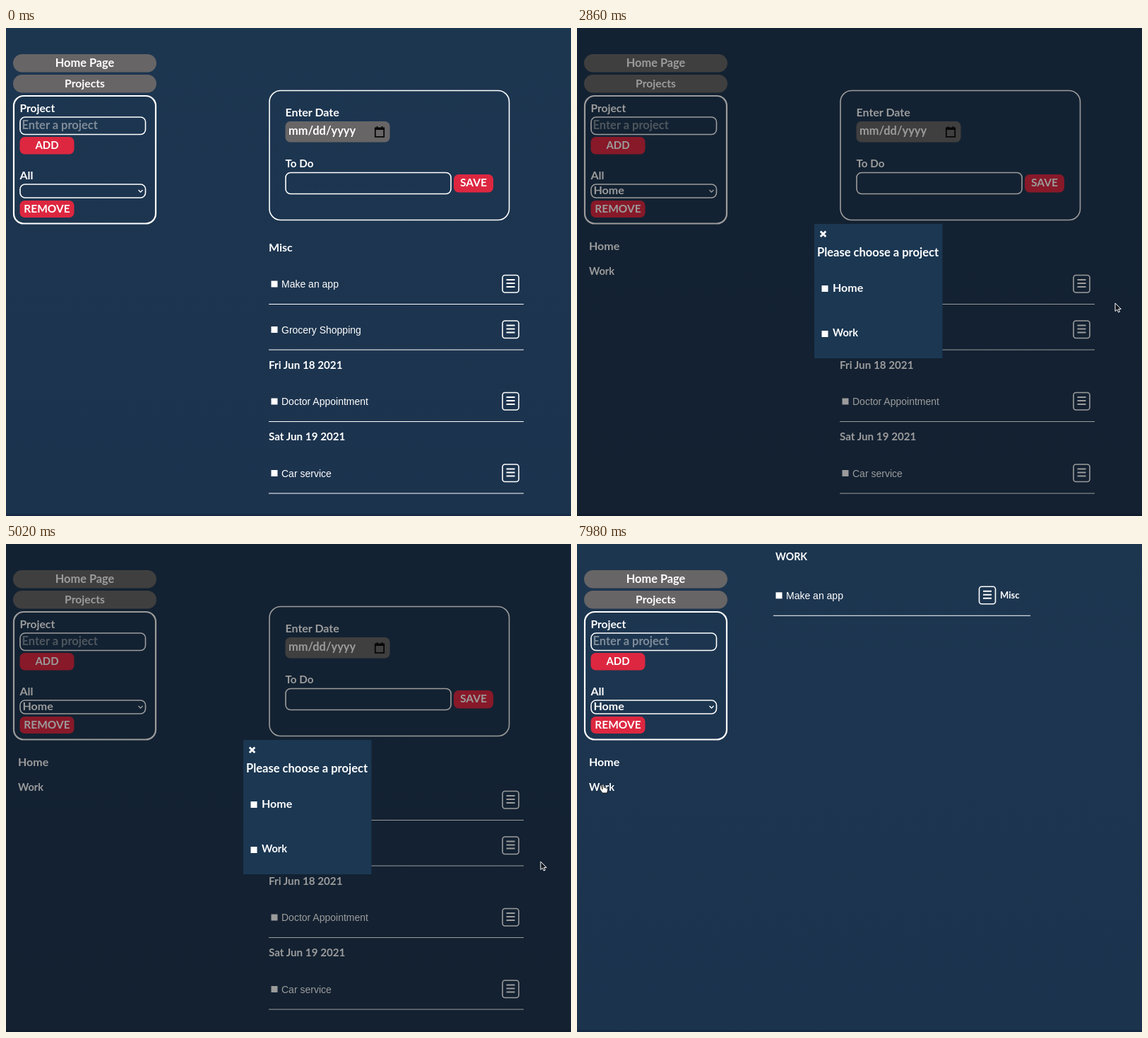
Recreate the animation shown at these times as an HTML page. Size 800 by 690 pixels, loop 8000 ms.

```html
<!DOCTYPE html>
<html lang="en">
<head>
<meta charset="utf-8">
<title>To-do list</title>
<style>
  html, body { margin: 0; width: 100%; height: 100%; overflow: hidden; background: #1c344f; }
  svg { display: block; width: 800px; height: 690px; }
  text { font: 700 16px Lato, sans-serif; fill: #fff; white-space: pre; }
  .plain { font: 400 14px "Liberation Sans", Arial, sans-serif; }
  .mid { text-anchor: middle; }
  .hint { fill: #7f8c99; font-size: 16.5px; }
  .box { fill: none; stroke: #fff; stroke-width: 1.6; }
  .grey { fill: #676566; }
  .red { fill: #dd2740; }
  .line { stroke: #fff; stroke-width: 1; }
</style>
</head>
<body>
<svg id="stage" viewBox="0 0 800 690">
  <defs>
    <linearGradient id="sky" x2="0" y2="1">
      <stop stop-color="#1d3650"/><stop offset="1" stop-color="#1c334e"/>
    </linearGradient>
  </defs>
  <rect width="800" height="690" fill="url(#sky)"/>
  <rect y="687" width="800" height="3" fill="#172a45"/>
  <g id="side"></g>
  <g id="list"></g>
  <g id="home"></g>
  <g id="work"></g>
  <g id="modal"></g>
  <g id="arrow">
    <path d="M0 0V11.5L2.7 9.1L4.6 13L6.5 12.1L4.7 8.4H8.3Z" fill="#10151c" stroke="#fff" stroke-width="1"/>
  </g>
  <g id="hand">
    <path d="M-1 0Q0-1 1 0V4L6 5.5Q7 6 6.5 8L5.5 12H-1L-4.5 7Q-4-6 -1 7Z" transform="translate(0 1)"
      fill="#fff" stroke="#111" stroke-width=".8" stroke-linejoin="round"/>
  </g>
</svg>
<script>
const $ = id => document.getElementById(id);
const add = (group, markup) => $(group).insertAdjacentHTML('beforeend', markup);
const show = (id, on) => $(id).setAttribute('display', on ? 'inline' : 'none');

const rect = (cls, x, y, w, h, r = 0, extra = '') =>
  `<rect class="${cls}" x="${x}" y="${y}" width="${w}" height="${h}" rx="${r}" ${extra}/>`;
const text = (x, y, str, cls = '', size = '', id = '') =>
  `<text x="${x}" y="${y}" class="${cls}" ${size && `style="font-size:${size}px"`} ${id && `id="${id}"`}>${str}</text>`;
const button = (x, y, w, h, label, size) =>
  rect('red', x, y, w, h, 7) + text(x + w / 2, y + 17, label, 'mid', size);
const checkbox = (x, cy) => rect('', x, cy - 4.5, 9, 9, 0, 'fill="#fff"');
const menuIcon = (x, cy) => rect('box', x, cy - 12.5, 23, 24.5, 3.5) +
  `<path d="M${x + 5.5} ${cy - 6}h12m-12 5h12m-12 5h12" stroke="#fff" stroke-width="2"/>`;
const task = (x, cy, name, iconX, lineX, lineEnd) =>
  checkbox(x, cy) + text(x + 14.5, cy + 5, name, 'plain') + menuIcon(iconX, cy) +
  `<path class="line" d="M${lineX} ${cy + 28.5}H${lineEnd}"/>`;

add('side',
  rect('grey', 10, 37, 203, 25.5, 12.7) + text(111.5, 55, 'Home Page', 'mid', 16.4) +
  rect('grey', 10, 66, 203, 25.5, 12.7) + text(111.5, 84, 'Projects', 'mid', 15.7) +
  rect('box', 11, 96, 201, 180.5, 14, 'style="stroke-width:2.2"') +
  text(19.5, 119, 'Project', '', 15.6) + rect('box', 20, 126, 177.5, 24.5, 7) +
  text(22.5, 142.5, 'Enter a project', 'hint', '', 'hint') + text(22.5, 142.5, '', '', '', 'typed') +
  button(19.5, 154, 77, 24.5, 'ADD', 15) +
  text(19.5, 214, 'All') + rect('box', 20, 221, 177.5, 19, 7) +
  '<path d="M187.5 229l3 3 3-3" fill="none" stroke="#fff" stroke-width="1.4"/>' +
  text(23.5, 235, 'Home', '', '', 'selected') +
  button(19.5, 244, 77, 24, 'REMOVE', 15.5) +
  text(17, 314, 'Home', '', '', 'homeLink') + text(17, 349, 'Work', '', 14.6, 'workLink'));

add('list',
  rect('box', 373, 88.5, 339.5, 183, 16) +
  text(395.5, 125, 'Enter Date') + rect('grey', 395.5, 132, 148, 29.5, 7) + text(400, 151, 'mm/dd/yyyy', '', 16.4) +
  '<path d="M522.8 141.5h12.4v12.4h-12.4zM522 143h14M525.5 139v3M532.5 139v3" fill="none" stroke="#080808" stroke-width="1.8"/>' +
  text(395.5, 197, 'To Do', '', 15.2) + rect('box', 396, 204.5, 234, 30, 7) +
  button(634, 207, 56, 25.5, 'SAVE', 15.5) +
  text(372, 316, 'Misc') +
  text(372, 482, 'Fri Jun 18 2021', '', 15.2) + text(372, 583, 'Sat Jun 19 2021', '', 15.2) +
  [[362, 'Make an app'], [426.5, 'Grocery Shopping'], [528, 'Doctor Appointment'], [629.5, 'Car service']]
    .map(([cy, name]) => task(375.5, cy, name, 703, 372, 733)).join(''));

const projectPage = (title, name) => text(281, 23, title, '', 14.2) +
  task(281.5, 72.8, name, 569.5, 278, 642) + text(599, 76.5, 'Misc', '', 13);
add('home', projectPage('HOME', 'Grocery Shopping'));
add('work', projectPage('WORK', 'Make an app'));

const tick = (id, cy) => `<g id="${id}">${rect('', 346.5, cy - 4.5, 9, 9, 1, 'fill="#0b75f5"')}
  <path d="M348.5 ${cy}l2 2.2 3.5-4.6" fill="none" stroke="#fff" stroke-width="1.5"/></g>`;
add('modal',
  rect('', 0, 0, 800, 690, 0, 'fill="#060606" fill-opacity=".4"') +
  rect('', 336, 277, 181.5, 190, 0, 'fill="#1b3752"') +
  '<path d="M344.8 287.5l7.5 7.5m0-7.5l-7.5 7.5" stroke="#fff" stroke-width="2.8"/>' +
  text(340, 323, 'Please choose a project', '', 16.5) +
  checkbox(346.5, 368.5) + text(362, 373, 'Home') + checkbox(346.5, 432.5) + text(362, 436, 'Work', '', 14.6) +
  tick('homeTick', 368.5) + tick('workTick', 432.5));

// Pointer stops: time, x, y
const stops = [
  [1760, 110, 140], [2200, 712, 360], [2350, 712, 360], [2530, 762, 389], [2900, 762, 389],
  [3250, 350, 430], [3600, 350, 430], [3900, 348, 289], [4050, 348, 289], [4170, 352, 294],
  [4270, 352, 294], [4560, 712, 424], [4670, 712, 424], [4800, 757, 449], [5020, 757, 449],
  [5310, 350, 367], [5620, 350, 367], [5900, 348.5, 290], [6610, 348.5, 290],
  [6950, 36, 306], [7350, 36, 306], [7620, 37, 339], [8000, 37, 339]
];
function pointerAt(t) {
  const i = Math.max(1, stops.findIndex(s => s[0] > t));
  const [t0, x0, y0] = stops[i - 1], [t1, x1, y1] = stops[i];
  const p = Math.min(1, Math.max(0, (t - t0) / (t1 - t0))), e = p * p * (3 - 2 * p);
  return [x0 + (x1 - x0) * e, y0 + (y1 - y0) * e];
}

const within = (t, a, b) => t >= a && t < b;
const typing = (t, word, start, step, enter) =>
  within(t, start, enter) ? word.slice(0, 1 + Math.floor((t - start) / step)) : '';

function draw(now) {
  const t = now % 8000;
  const typed = typing(t, 'Home', 220, 120, 800) || typing(t, 'Work', 1020, 120, 1580);
  $('typed').textContent = typed;
  show('hint', !typed);
  show('selected', t >= 800);
  show('homeLink', t >= 800);
  show('workLink', t >= 1580);

  show('list', t < 7050);
  show('home', within(t, 7050, 7720));
  show('work', t >= 7720);
  show('modal', within(t, 2640, 4080) || within(t, 4860, 6200));
  show('workTick', within(t, 3400, 4080));
  show('homeTick', within(t, 5480, 6200));

  const [x, y] = pointerAt(t);
  const overLink = x < 60 || (x > 702 && x < 726 && within(t, 2050, 4800));
  show('arrow', t >= 1760 && !overLink);
  show('hand', t >= 1760 && overLink);
  for (const id of ['arrow', 'hand']) $(id).setAttribute('transform', `translate(${x} ${y})`);
}

const start = performance.now();
(function loop() {
  draw(performance.now() - start);
  requestAnimationFrame(loop);
})();
</script>
</body>
</html>
```
